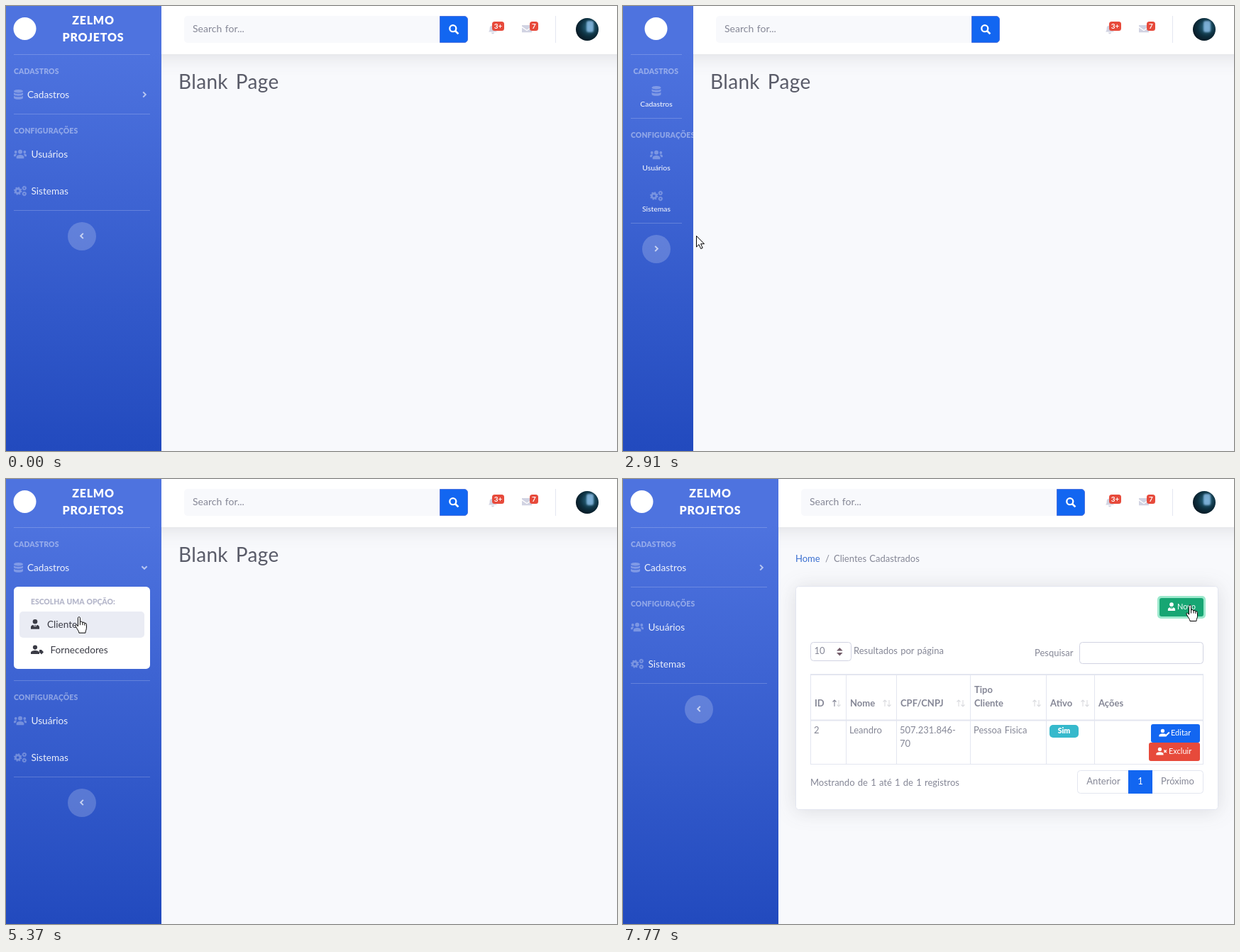
Animation of 861x628 px, one loop 8000 ms. Source, as an HTML page:

```html
<!DOCTYPE html>
<html lang="pt-BR">
<head>
<meta charset="utf-8">
<title>Painel</title>
<style>
  html, body { margin: 0; width: 100%; height: 100%; overflow: hidden; background: #f8f9fc; }
  svg { display: block; }
  text { font-family: Lato, "Open Sans", sans-serif; word-spacing: .07em; white-space: pre; }
  .shadow { filter: drop-shadow(0 2px 14px #3a3b4526); }
  .glow { filter: blur(1.2px); }
</style>
</head>
<body>
<svg width="861" height="628" viewBox="0 0 861 628">
  <defs>
    <linearGradient id="blue" x2="0" y2="1">
      <stop offset=".1" stop-color="#4e73df"/><stop offset="1" stop-color="#224abe"/>
    </linearGradient>
    <radialGradient id="photo" cx=".6" cy=".4" r=".65">
      <stop offset="0" stop-color="#2f7390"/><stop offset=".6" stop-color="#0d3040"/>
      <stop offset="1" stop-color="#081722"/>
    </radialGradient>
  </defs>
  <g id="scene"></g>
</svg>
<script>
const LOOP = 8000, START = 222, STEP = 76.4;
const COLLAPSE = 2800, EXPAND = 3260, OPEN = 4352, LOAD = 5800, CLICK = 7590;
const GRAY = '#858796', LINE = '#e3e6f0', BLUE = '#1266f1', RED = '#e74a3b';

// Pointer path: time, x, y
const path = [
  [222, 850, 586], [600, 430, 330], [980, 102, 114], [1070, 100, 108], [1290, 84, 125],
  [1450, 86, 209], [1600, 92, 261], [1820, 105, 322], [1979, 109, 329], [2250, 138, 225],
  [2420, 126, 215], [2660, 108, 325], [2790, 106, 326], [2896, 103, 324], [3130, 52, 342],
  [3270, 50, 346], [3507, 155, 337], [3740, 279, 270], [3980, 235, 165], [4240, 110, 131],
  [4350, 84, 128], [4880, 84, 128], [5140, 92, 132], [5230, 92, 132], [5300, 100, 190],
  [5370, 105, 198], [5800, 105, 198], [6100, 120, 253], [6190, 121, 254], [6620, 304, 341],
  [7080, 620, 275], [7340, 815, 195], [7480, 803, 180], [7540, 799, 178], [8000, 799, 178],
];

function pointerAt(t) {
  const i = Math.max(1, path.findIndex(p => p[0] >= t));
  const [a, b] = [path[i - 1], path[i]];
  const f = (t - a[0]) / (b[0] - a[0]);
  return [a[1] + (b[1] - a[1]) * f, a[2] + (b[2] - a[2]) * f];
}

const text = (x, y, s, size = 13, fill = GRAY, more = '') =>
  `<text x="${x}" y="${y}" font-size="${size}" fill="${fill}" ${more}>${s}</text>`;
const rect = (x, y, w, h, fill, r = 0, more = '') =>
  `<rect x="${x}" y="${y}" width="${w}" height="${h}" fill="${fill}" rx="${r}" ${more}/>`;
const box = (x, y, w, h, stroke = LINE, more = '') =>
  rect(x + .5, y + .5, w, h, '#fff', 4, `stroke="${stroke}" ${more}`);
const circle = (x, y, r, fill = 'currentColor', more = '') =>
  `<circle cx="${x}" cy="${y}" r="${r}" fill="${fill}" ${more}/>`;
const shape = d => `<path d="${d}" fill="currentColor"/>`;
const stroke = (d, w) => `<path d="${d}" fill="none" stroke="currentColor" stroke-width="${w}"/>`;
const ring = (x, y, r, w, dash = 0) =>
  circle(x, y, r, 'none', `stroke="currentColor" stroke-width="${w}" stroke-dasharray="${dash}"`);
const gear = (x, y, r) => ring(x, y, r * .58, r * .5) + ring(x, y, r * .88, r * .3, Math.PI * r * .88 / 8);
const MIDDLE = 'text-anchor="middle" ', BOLD = 'font-weight="700" ', BLACK = 'font-weight="900" ';

const person = circle(-3, -3.4, 3.1) + shape('M-9 6V4C-9 0 3 0 3 4V6Z');
const icons = {
  database: shape('M-6.5-4.7C-6.5-7.7 6.5-7.7 6.5-4.7S-6.5-1.7-6.5-4.7ZM-6.5-2.8C-4-.8 4-.8 6.5-2.8V-.2C6.5 2.4-6.5 2.4-6.5-.2Z'
    + 'M-6.5 1.7C-4 3.7 4 3.7 6.5 1.7V4.4C6.5 7.6-6.5 7.6-6.5 4.4Z'),
  users: circle(0, -3.2, 3) + circle(-6.3, -3, 1.9) + circle(6.3, -3, 1.9)
    + shape('M-5.3 6.2V4C-5.3 0 5.3 0 5.3 4V6.2ZM-9 3.3V2C-9-1-5.5-1-4.7 0Q-6 1-6.3 3.3ZM9 3.3V2C9-1 5.5-1 4.7 0Q6 1 6.3 3.3Z'),
  cogs: gear(-3.3, 0, 5.6) + gear(5.8, -4, 3.3) + gear(5.8, 4, 3.3),
  tie: circle(0, -3.7, 3.3) + shape('M-6 6.8V4C-6 2-4 1-2.4 1L0 6L2.4 1C4 1 6 2 6 4V6.8ZM-.9 1H.9L.4 2.2L1 4.5L0 5.7L-1 4.5L-.4 2.2Z'),
  tag: person + shape('M3 0H6L9 3.2L6 6.5L3 3.5Z'),
  edit: person + stroke('M2 5L8-1', 2.4),
  remove: person + stroke('M4-2L8 2M8-2L4 2', 1.7),
  search: ring(-1.2, -1.3, 4.5, 2.3) + stroke('M1.8 1.8L6.4 6.4', 2.7),
  bell: shape('M-6 4C-4 2-4.5 0-4.3-2C-4-6 4-6 4.3-2C4.5 0 4 2 6 4ZM-2 5H2C2 7.5-2 7.5-2 5Z'),
  mail: shape('M-7-5H7V-3.2L0 1.7L-7-3.2ZM-7-1.6L0 3.3L7-1.6V5.2H-7Z'),
  chevron: stroke('M-1.8-3.6L1.8 0L-1.8 3.6', 2),
};
const icon = (name, x, y, color = '#fff', alpha = 1, turn = '') =>
  `<g transform="translate(${x} ${y}) ${turn}" color="${color}" opacity="${alpha}">${icons[name]}</g>`;

function topbar(side) {
  const x = side + 32;
  const badge = (x, w, s) => rect(x, 22, w, 13, RED, 3.5) + text(x + w / 2, 32, s, 10, '#fff', MIDDLE + BOLD);
  return rect(side - 40, -40, 950 - side, 108, '#fff', 0, 'class="shadow"')
    + rect(x, 14, 380, 38, '#f8f9fc', 5) + text(x + 12, 37, 'Search for...', 14)
    + `<path d="M${x + 360.5} 14.5h34.5a4.5 4.5 0 0 1 4.5 4.5v28a4.5 4.5 0 0 1-4.5 4.5h-34.5z" fill="${BLUE}" stroke="#4e73df"/>`
    + icon('search', x + 380, 33)
    + icon('bell', 686, 32.5, '#d1d3e2') + badge(685, 17, '3+')
    + icon('mail', 734, 32, '#d1d3e2') + badge(738, 12, '7')
    + rect(774, 14, 1, 38, LINE)
    + circle(819, 33, 16, 'url(#photo)') + rect(818, 21, 10, 16, '#8fc0ea', 3, 'class="glow" opacity=".8"');
}

function sidebar(small, drop, hover) {
  const side = small ? 99 : 219, white = '#fff';
  const shift = y => y + drop;
  const divider = y => rect(11, y, small ? 72 : 192, 1, white, 0, 'opacity=".2"');
  const heading = (x, y, s) => text(x, y, s, 10.4, white, `${BLACK} opacity=".4" letter-spacing=".15"`);
  const item = (key, name, ic, y, wideX, iconX) => {
    const on = hover === key;
    return small
      ? icon(ic, 47, y, white, on ? 1 : .3) + text(47, y + 22, name, 10.4, white, MIDDLE)
      : icon(ic, iconX, y, white, on ? 1 : .3) + text(wideX, y + 5, name, 13.6, white, `opacity="${on ? 1 : .9}"`);
  };
  const [bx, by] = small ? [47, 343] : [107, shift(325)];
  const brand = (y, s) => text(123, y, s, 16, white, `${MIDDLE} ${BLACK} letter-spacing=".8"`);
  return `<svg width="${side}" height="628">`
    + rect(0, 0, side, 628, 'url(#blue)')
    + circle(small ? 46.5 : 26.5, 32, 16, white)
    + (small ? '' : brand(26, 'ZELMO') + brand(50, 'PROJETOS')
      + icon('chevron', 195, 125, white, .6, drop ? 'rotate(90)' : ''))
    + divider(68) + heading(small ? 14.5 : 11, 96, 'CADASTROS')
    + item('data', 'Cadastros', 'database', small ? 120 : 125, 30, 17.5)
    + menu(drop, hover)
    + divider(small ? 158 : shift(152)) + heading(11, small ? 186 : shift(180), 'CONFIGURAÇÕES')
    + item('users', 'Usuários', 'users', small ? 210 : shift(209), 35.5, 20)
    + item('systems', 'Sistemas', 'cogs', small ? 268 : shift(261), 35.5, 20)
    + divider(small ? 306 : shift(288))
    + circle(bx, by, 20, white, `opacity="${hover === 'toggle' ? .25 : .2}"`)
    + icon('chevron', bx, by - .5, white, .65, small ? '' : 'scale(-1 1)')
    + '</svg>';
}

function menu(drop, hover) {
  if (!drop) return '';
  const dark = '#3a3b45';
  return `<svg x="11" y="152" width="192" height="${Math.min(116, drop)}">`
    + rect(0, 0, 192, 116, '#fff', 5.6)
    + text(24, 25, 'ESCOLHA UMA OPÇÃO:', 10.4, '#b7b9cc', BLACK)
    + (hover === 'clients' ? rect(8, 35, 176, 37, '#eaecf4', 5) : '')
    + icon('tie', 30, 53, dark) + text(47, 58, 'Clientes', 13.6, dark)
    + icon('tag', 33, 89, dark) + text(51.5, 94, 'Fornecedores', 13.6, dark)
    + '</svg>';
}

function clientPage(hover, focus) {
  const columns = [264, 314, 385, 489, 596, 664, 817];
  const head = (x, y, s) => text(x, y, s, 13, GRAY, BOLD);
  const sorter = (x, up) => `<g color="${GRAY}" transform="translate(${x} 316)">`
    + `<g opacity="${up ? 1 : .3}">${stroke('M0 5V-4M-2.5-1.5L0-4L2.5-1.5', 1.1)}</g>`
    + `<g opacity=".3">${stroke('M6-4V5M3.5 2.5L6 5L8.5 2.5', 1.1)}</g></g>`;
  const button = (x, y, w, color, ic, iconX, textX, s) => rect(x, y, w, 26, color, 3)
    + icon(ic, x + iconX, y + 12.3, '#fff', 1, 'scale(.85)') + text(x + textX, y + 16.3, s, 11, '#fff');
  const newColor = hover === 'new' ? '#17a673' : '#1cc88a';
  return text(243, 117, 'Home', 13, '#3a6fd0') + text(285, 117, '/') + text(297, 117, 'Clientes Cadastrados')
    + box(243, 151, 595, 315, LINE, 'class="shadow"')
    + (focus ? rect(753, 165, 68, 32, '#9de9cd', 5) : '')
    + button(756, 168, 62, newColor, 'tie', 17, 25, 'Novo')
    + box(264, 230, 57, 26, '#d1d3e2') + text(269.5, 246.5, '10')
    + '<path d="M301 242.5h8.6l-4.3-4.6zM301 245h8.6l-4.3 4.6z" fill="#735c69"/>'
    + text(325, 247, 'Resultados por página') + text(580, 250, 'Pesquisar')
    + box(643, 230, 174, 30, '#d1d3e2')
    + columns.map(x => rect(x, 276, 1, 127, LINE)).join('')
    + rect(264, 275, 554, 2, LINE) + rect(264, 339.5, 554, 2, LINE) + rect(264, 402, 554, 1, LINE)
    + head(270, 321, 'ID') + head(320, 321, 'Nome') + head(391, 321, 'CPF/CNPJ') + head(495, 302, 'Tipo')
    + head(495, 321, 'Cliente') + head(602, 321, 'Ativo') + head(670, 321, 'Ações')
    + [298, 369, 473, 580, 648].map((x, i) => sorter(x, !i)).join('')
    + text(269, 359, '2') + text(319, 359, 'Leandro') + text(390, 359, '507.231.846-') + text(390, 378, '70')
    + text(494, 359, 'Pessoa Fisica')
    + rect(601, 347, 41, 18, '#36b9cc', 5) + text(621.5, 359.3, 'Sim', 10.5, '#fff', MIDDLE + BLACK)
    + button(744, 346, 69, BLUE, 'edit', 19, 28, 'Editar') + button(741, 372, 72, RED, 'remove', 18, 28, 'Excluir')
    + text(264, 433, 'Mostrando de 1 até 1 de 1 registros')
    + box(640, 411, 177, 32) + rect(712, 411, 34, 33, BLUE)
    + text(677, 431, 'Anterior', 13, GRAY, MIDDLE) + text(729, 431, '1', 13, '#fff', MIDDLE)
    + text(781.5, 431, 'Próximo', 13, GRAY, MIDDLE);
}

function hoverAt(x, y, small, drop, loaded) {
  const by = small ? 343 : 325 + drop;
  if (Math.hypot(x - (small ? 47 : 107), y - by) < 20) return 'toggle';
  if (loaded && x > 755 && x < 818 && y > 167 && y < 194) return 'new';
  if (small || x > 219) return '';
  const inside = (top, bottom) => y >= top && y < bottom;
  if (inside(99, 151)) return 'data';
  if (drop > 72 && inside(187, 224)) return 'clients';
  if (inside(183 + drop, 235 + drop)) return 'users';
  return inside(235 + drop, 287 + drop) ? 'systems' : '';
}

function cursor(x, y, hand) {
  const d = hand
    ? 'M-1.5 1.5C-1.5-.5 1.5-.5 1.5 1.5V7C3 6 5 6.5 5 8C6.5 7 8 7.5 8 9C9.5 8.2 10.5 9 10.5 10.5V15.5C10.5 18 9 19.5 9 22.5H0C0 20-2.5 17.5-5 13C-5.5 11-3.7 10.5-2.8 11.5L-1.5 13.2ZM1.5 7V11.5M5 8V11.5M8 9V12'
    : 'M.5.5V16L4 12.6L6.7 18.5L9.2 17.4L6.6 11.7H11.5Z';
  return `<path d="${d}" transform="translate(${x.toFixed(1)} ${y.toFixed(1)})" fill="#fff" stroke="#000"/>`;
}

function render(t) {
  const small = t >= COLLAPSE && t < EXPAND, loaded = t >= LOAD;
  const progress = loaded ? 0 : Math.min(1, Math.max(0, (t - OPEN) / 350));
  const drop = Math.round(132 * (1 - (1 - progress) ** 2.4));
  const side = small ? 99 : 219;
  const visible = t >= START;
  const [x, y] = pointerAt(t);
  const hover = visible ? hoverAt(x, y, small, drop, loaded) : '';
  const title = () => text(side + 24, 117, 'Blank Page', 28, '#5a5c69', 'letter-spacing=".35" style="word-spacing:.12em"');
  return topbar(side)
    + (loaded ? clientPage(hover, t > CLICK) : title())
    + sidebar(small, drop, hover)
    + (visible ? cursor(x, y, hover) : '');
}

const scene = document.getElementById('scene');
let shown;
function tick() {
  const step = Math.floor((performance.now() % LOOP - START) / STEP);
  if (step !== shown) {
    shown = step;
    scene.innerHTML = render(step < 0 ? 0 : START + step * STEP);
  }
  requestAnimationFrame(tick);
}
tick();
</script>
</body>
</html>
```
